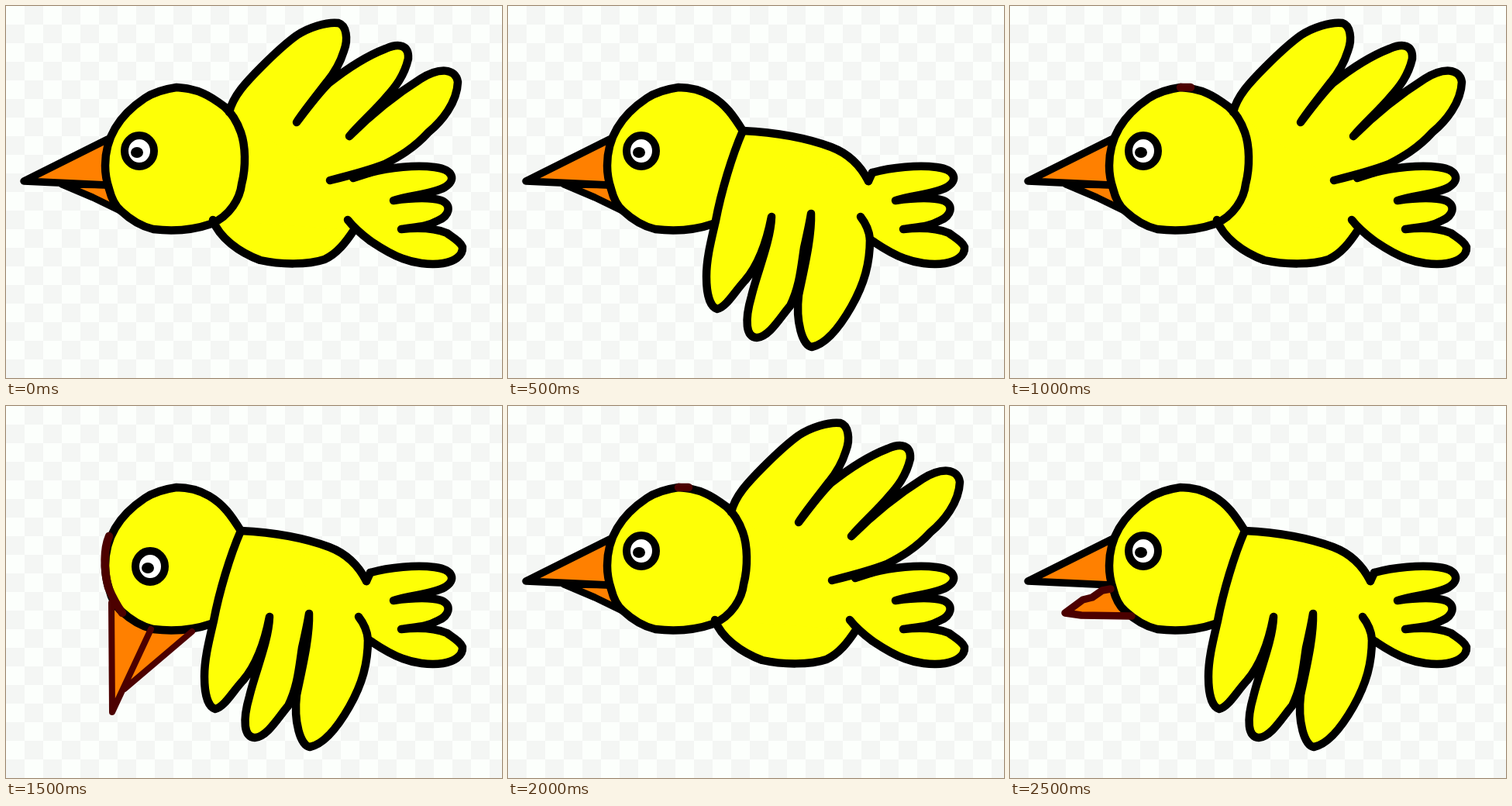
Recreate the animation shown at these times as an HTML page with a canvas. Size 640 by 480 pixels, loop 3000 ms.

```html
<!DOCTYPE html>
<html lang="en">
<head>
<meta charset="utf-8">
<title>Yellow bird</title>
<style>
  html, body { margin: 0; width: 100%; height: 100%; overflow: hidden; }
  canvas { display: block; }
</style>
</head>
<body>
<canvas id="stage" width="640" height="480"></canvas>
<script>
const ctx = document.getElementById('stage').getContext('2d');
const YELLOW = '#feff06', ORANGE = '#ff8000', MAROON = '#4c0000', BLACK = '#000';
const POSE_MS = 500;
const path = d => new Path2D(d);

// The face runs from the crown down the left side to the chin.
const face = `C206,107 191,111 179,119 C146,141 128,170 128,206 C128,218 130,227 133,236
  C136,248 140,257 148,264 C163,278 177,285 190,288 C215,291 242,289 265,281`;
const headUp = path(`M265,281 C289,271 302,248 304,230 C310,207 309,180 303,163
  C298,149 290,137 282,130 C270,121 264,117 255,113 C242,107 231,106 220,105 ${face}`);
const headDown = path(`M303,161 C291,142 281,127 262,116 C250,109 235,105 220,105 ${face}`);

const wingUp = path(`M288,137 C293,116 309,99 330,78 C346,62 361,48 375,38
  C390,28 414,20 429,22 C439,25 442,42 436,58 C431,74 424,86 414,98 C401,115 384,136 375,150
  C388,133 402,114 416,100 C436,84 464,65 490,55 C508,47 520,51 519,68
  C514,90 502,105 491,117 C476,135 455,153 443,168 C467,144 500,116 535,94
  C559,79 580,80 583,98 C582,125 562,149 545,163 C526,184 506,195 489,204 C466,213 442,219 418,225`);
const belly = path(`M267,276 C275,299 301,318 328,328 C355,334 390,334 411,327
  C428,319 439,304 449,289`);
const bodyUpFill = path(`M288,137 L375,150 L443,168 L418,225 L470,215 L500,251 L510,288
  L470,303 L441,276 L449,289 L411,320 L328,320 L267,276 Z`);

const tail = path(`M470,215 C495,208 530,205 553,208 C578,211 581,225 566,234
  C549,243 522,244 500,251 C522,248 545,246 562,251 C576,257 572,271 557,277
  C543,285 528,285 510,288 C530,286 552,286 569,293 C577,299 586,304 589,311
  C590,323 577,330 564,332 C546,335 525,331 512,326 C495,320 482,311 470,303`);
const tailRootUp = path('M448,222 L470,215 M441,276 C448,285 458,294 470,303');
const tailRootDown = path('M465,226 L470,215 M455,272 C462,281 466,289 467,301 L473,305');

const back = path('M303,161 C343,163 382,169 417,182 C438,190 454,204 465,226');
const wingDown = path(`M303,161 C289,193 275,240 268,277 C262,303 256,326 256,349
  C256,370 260,388 270,391 C282,388 292,369 306,354 C323,334 334,303 340,272
  C339,303 321,345 314,375 C305,406 307,428 321,428 C337,427 351,402 364,387
  C376,363 378,339 382,312 C386,294 389,281 391,268 C392,298 382,339 375,373
  C371,408 380,438 392,440 C412,436 431,409 443,388 C460,358 467,332 467,301`);
const bodyDownFill = path('M303,161 L417,182 L465,226 L500,251 L510,288 L470,303 L341,272 L268,277 Z');

const upperBeak = path('M131,172 L101,187 L23,226 L131,231');
const lowerBeak = path('M131,231 L72,230 L112,247 L147,264');
const openBeak = path('M130,236 L119,238 L106,247 L94,250 L71,267 L92,270 L157,271');
const peckBeak = path('M136,254 L137,395 L153,365 L240,291 L187,288');
const peckLines = path('M136,254 L137,395 L187,288 M153,365 L240,291');
const cheek = path('M133,168 C126,184 126,211 132,234 C138,248 143,257 150,267');
const crown = path('M220,105 H233');

function fill(color, ...shapes) {
  ctx.fillStyle = color;
  shapes.forEach(shape => ctx.fill(shape));
}

function stroke(color, width, ...shapes) {
  ctx.strokeStyle = color;
  ctx.lineWidth = width;
  shapes.forEach(shape => ctx.stroke(shape));
}

function oval(x, y, rx, ry) {
  const shape = new Path2D();
  shape.ellipse(x, y, rx, ry, 0, 0, Math.PI * 2);
  return shape;
}

function drawBackdrop() {
  for (let y = 0; y < 20; y++)
    for (let x = 0; x < 27; x++) {
      ctx.fillStyle = (x + y) % 2 ? '#f4f6f4' : '#fcfffc';
      ctx.fillRect(x * 24, y * 24, 24, 24);
    }
}

function drawBody(wingRaised) {
  if (wingRaised) {
    fill(YELLOW, bodyUpFill, wingUp, belly, tail, headUp);
    stroke(BLACK, 10.5, wingUp, belly, tail, tailRootUp, headUp);
  } else {
    fill(YELLOW, bodyDownFill, wingDown, back, tail, headDown);
    stroke(BLACK, 10.5, wingDown, back, tail, tailRootDown, headDown);
  }
}

function drawEye(x, y) {
  const ring = oval(x, y, 19, 20);
  fill('#fff', ring);
  stroke(BLACK, 10, ring);
  fill(BLACK, oval(x - 3, y + 2, 8, 7));
}

function draw(pose) {
  const wingRaised = pose % 2 === 0, pecking = pose === 3, chirping = pose === 5;
  drawBackdrop();
  if (pecking) fill(ORANGE, peckBeak);
  else fill(ORANGE, upperBeak, chirping ? openBeak : lowerBeak);
  drawBody(wingRaised);
  if (pecking) {
    stroke(MAROON, 8, peckLines);
    stroke(MAROON, 10.5, cheek);
  } else {
    stroke(BLACK, 9.5, upperBeak);
    if (chirping) stroke(MAROON, 9.5, openBeak);
    else stroke(BLACK, 9, lowerBeak);
  }
  if (wingRaised && pose > 0) stroke(MAROON, 10.5, crown);
  drawEye(pecking ? 186 : 172, pecking ? 207 : 187);
}

ctx.lineCap = ctx.lineJoin = 'round';
function tick() {
  draw(Math.floor(performance.now() / POSE_MS) % 6);
  requestAnimationFrame(tick);
}
tick();
</script>
</body>
</html>
```
